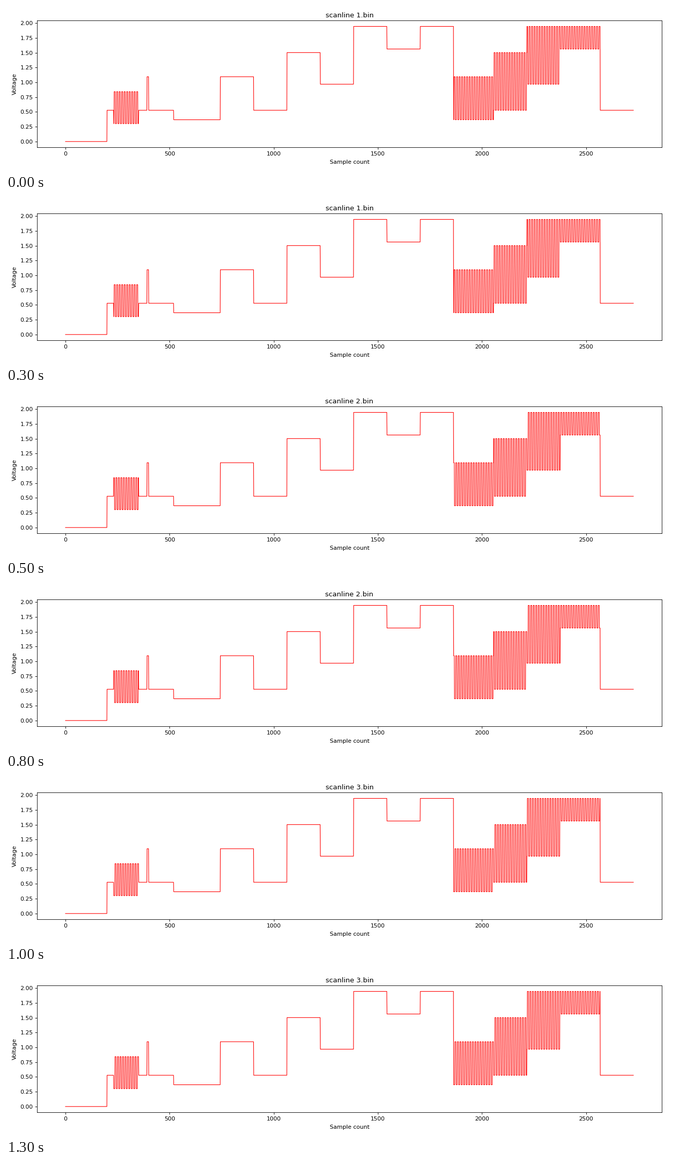
Recreate the animation shown at these times as a matplotlib script. Size 1280 by 320 pixels, loop 1.5 s.

```python
import numpy as np
import matplotlib.pyplot as plt
from matplotlib.animation import FuncAnimation

W, H = 1280, 320
DPI = 80
LINES = 3
DOT = 8            # samples per dot
CYCLE = 12         # samples per subcarrier cycle
BAR = 20           # dots per test bar

SYNC = 0.0
BURST = 0.302, 0.842
LOW = 0.368, 0.528, 0.968, 1.562
HIGH = 1.094, 1.502, 1.944, 1.944
BLACK = LOW[1]


def hold(dots, low, high=None):
    """Sample pairs (low, high); a flat level when high is left out."""
    pair = low, low if high is None else high
    return np.tile(pair, (dots * DOT, 1))


def scanline():
    parts = [hold(25, SYNC), hold(4, BLACK), hold(15, *BURST),
             hold(5, BLACK), hold(1, HIGH[0]), hold(15, BLACK)]
    # grey staircase: each luma step shows its low, then its high level
    for step, (low, high) in enumerate(zip(LOW, HIGH)):
        parts += [hold(BAR if step else BAR + 8, low), hold(BAR, high)]
    # the same steps again, switching at the subcarrier rate
    for step, (low, high) in enumerate(zip(LOW, HIGH)):
        parts.append(hold(BAR if step in (1, 2) else BAR + 4, low, high))
    parts.append(hold(BAR, BLACK))
    return np.concatenate(parts).T


low, high = scanline()
samples = np.arange(len(low))


def voltage(line):
    """The subcarrier phase carries over from one line to the next."""
    phase = (samples + line * len(samples) + CYCLE // 2) % CYCLE
    return np.where(phase < CYCLE // 2, high, low)


fig, ax = plt.subplots(figsize=(W / DPI, H / DPI), dpi=DPI)
left, right, top, bottom, pad = 60, 1268, 28.4, 274, 12
fig.subplots_adjust(left=left / W, right=right / W,
                    top=1 - top / H, bottom=1 - bottom / H)

trace, = ax.plot(samples, voltage(0), color="red", linewidth=1)
title = ax.set_title("scanline 1.bin")

# axis labels keep a fixed distance from the figure's edge
ax.set_xlabel("Sample count", va="bottom")
ax.set_ylabel("Voltage", va="top")
ax.xaxis.set_label_coords((left + right) / 2 / W, pad / H,
                          transform=fig.transFigure)
ax.yaxis.set_label_coords(pad / W, 1 - (top + bottom) / 2 / H,
                          transform=fig.transFigure)


def update(line):
    trace.set_ydata(voltage(line))
    title.set_text(f"scanline {line + 1}.bin")
    return trace, title


anim = FuncAnimation(fig, update, frames=LINES, interval=500,
                     repeat=True, repeat_delay=0)
plt.show()
```
